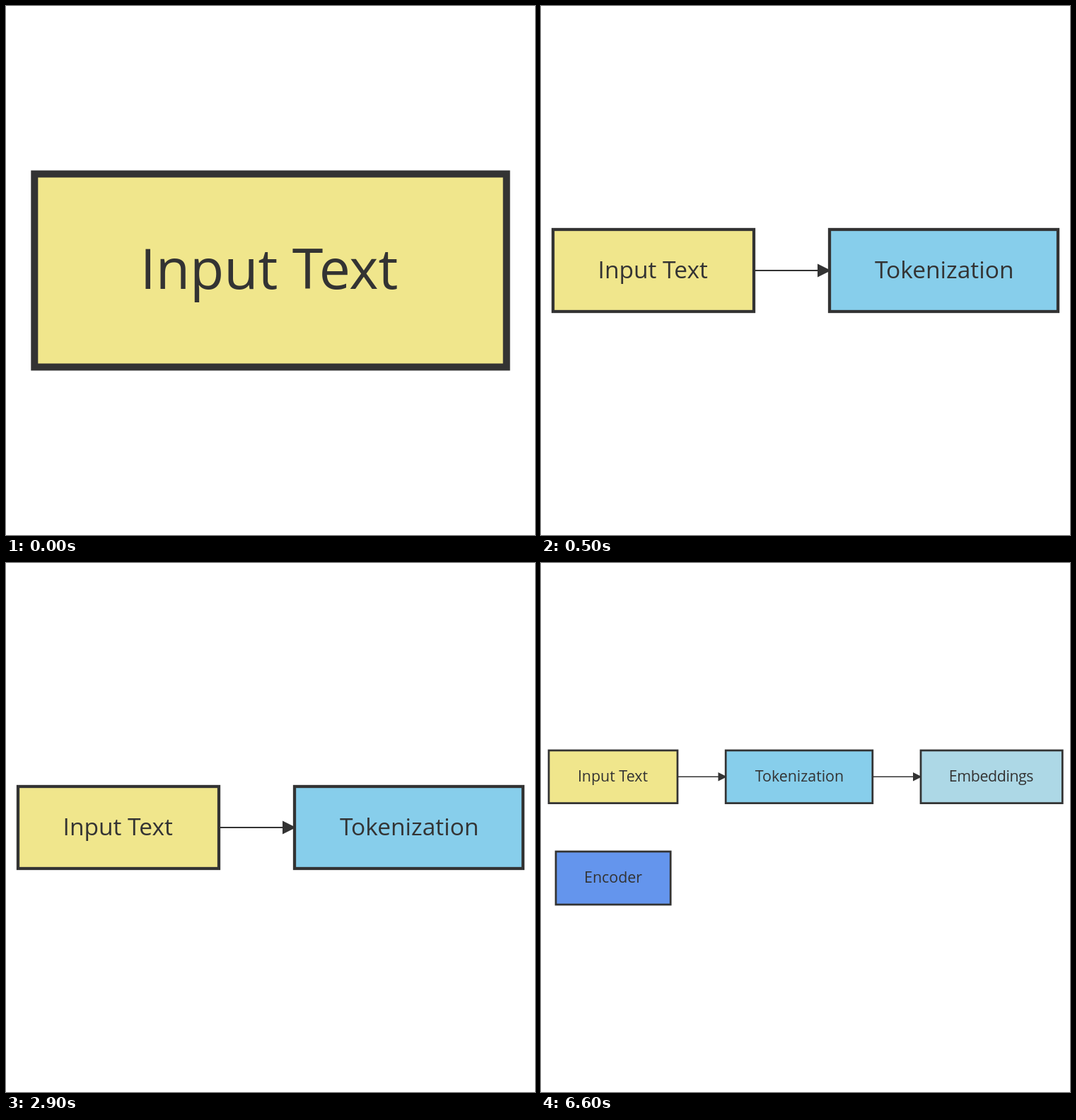
Animation, 748 px wide and 748 px high, one loop 8 s. Source, as an HTML page:

```html
<!DOCTYPE html>
<html lang="en">
<head>
<meta charset="utf-8">
<title>Text pipeline</title>
<style>
  html, body { margin: 0; width: 100%; height: 100%; overflow: hidden; background: #fff; }
  svg { display: block; width: 100%; height: 100%; }
  text { font-family: "Open Sans", sans-serif; fill: #333; text-anchor: middle; }
  rect { stroke: #333; }
</style>
</head>
<body>
<svg id="stage" viewBox="0 0 748 748"></svg>
<script>
const LOOP = 8000;
const INK = '#333';
const KHAKI = '#f0e68c', SKY = '#87ceeb', PALE = '#add8e6', BLUE = '#6495ed';

// Node: label, fill, left, top, right, bottom, baseline, shift (em), tracking (em)
const scenes = [
  { start: 0, stroke: 10, font: 78.7, arrows: [], nodes: [
    ['Input Text', KHAKI, 40.3, 237.5, 707.7, 510.5, 400, -0.025]
  ] },
  { start: 500, stroke: 4.3, font: 33.5, nodes: [
    ['Input Text', KHAKI, 17, 316, 301, 432, 385, -0.025],
    ['Tokenization', SKY, 408, 316, 731, 432, 385, 0.02]
  ], arrows: [[301, 391, 410, 374]] },
  { start: 4500, stroke: 2.75, font: 21.4, nodes: [
    ['Input Text', KHAKI, 11, 265, 193, 339.6, 309, -0.025],
    ['Tokenization', SKY, 261.2, 265, 468.8, 339.6, 309, 0.02],
    ['Embeddings', PALE, 537, 265, 737.3, 339.6, 309, -0.03, -0.02],
    ['Encoder', BLUE, 21, 408, 183.2, 483, 452]
  ], arrows: [[193, 250.5, 263, 302.3], [468.8, 526, 538.5, 302.3]] }
];

function drawNode([label, fill, l, t, r, b, base, shift = 0, track = 0], { stroke, font }) {
  const x = (l + r) / 2 + shift * font;
  return `<rect x="${l}" y="${t}" width="${r - l}" height="${b - t}" fill="${fill}" stroke-width="${stroke}"/>
    <text x="${x}" y="${base}" font-size="${font}" letter-spacing="${track * font}">${label}</text>`;
}

function drawArrow([from, neck, tip, y], { stroke }) {
  const half = (tip - neck) / 2;
  return `<path d="M${from} ${y}H${neck + 1}" stroke="${INK}" stroke-width="${stroke / 2}"/>
    <path d="M${neck} ${y - half}L${tip} ${y}L${neck} ${y + half}Z" fill="${INK}"/>`;
}

const stage = document.getElementById('stage');
let shown = null;

function render(ms) {
  const scene = scenes.findLast(s => ms >= s.start);
  if (scene === shown) return;
  shown = scene;
  stage.innerHTML = scene.arrows.map(a => drawArrow(a, scene)).join('') +
    scene.nodes.map(n => drawNode(n, scene)).join('');
}

const begin = performance.now();
function tick() {
  render((performance.now() - begin) % LOOP);
  requestAnimationFrame(tick);
}
tick();
</script>
</body>
</html>
```
